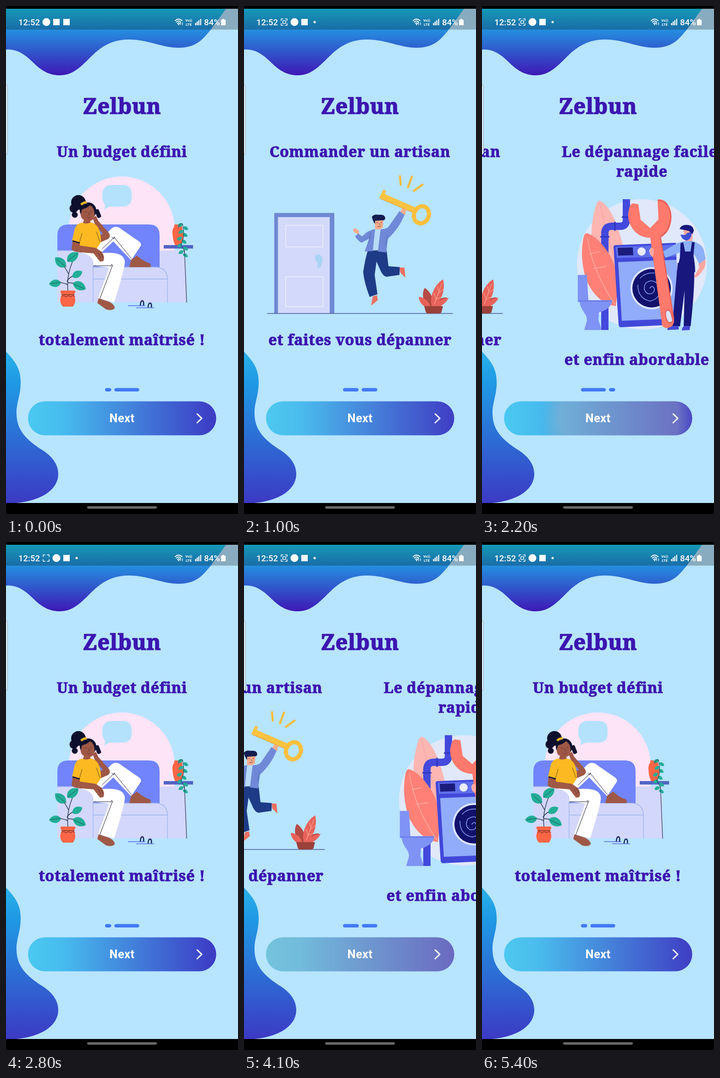
An HTML page that plays this animation: 506 px wide and 1107 px high, repeating every 5.6 s.

```html
<!DOCTYPE html>
<html lang="fr">
<head>
<meta charset="utf-8">
<title>Onboarding</title>
<style>
  html, body { margin: 0; width: 100%; height: 100%; overflow: hidden; background: #000; }
  svg { display: block; width: 506px; height: 1107px; }
  .serif { font: 700 32.4px "Noto Serif", serif; letter-spacing: .7px; fill: #3c16b0; stroke: #3c16b0; stroke-width: 1.1; text-anchor: middle; }
  .title { font-size: 46.6px; stroke-width: 1.6; }
  .bar { font: 500 18.5px Roboto, sans-serif; fill: #fff; }
  .tiny { font: 700 8px Roboto, sans-serif; fill: #fff; text-anchor: middle; }
  .next { font: 700 25.5px Roboto, sans-serif; letter-spacing: .4px; fill: #fff; text-anchor: middle; }
  .line { fill: none; stroke-linecap: round; stroke-linejoin: round; }
  .flat { stroke-linecap: butt; }
</style>
</head>
<body>
<svg viewBox="0 0 506 1107">
  <defs>
    <linearGradient id="wave" gradientUnits="userSpaceOnUse" x1="0" y1="6" x2="0" y2="151">
      <stop offset="0" stop-color="#1bccf4"/><stop offset=".31" stop-color="#2490df"/><stop offset="1" stop-color="#3e18b6"/>
    </linearGradient>
    <linearGradient id="blob" gradientUnits="userSpaceOnUse" x1="0" y1="753" x2="0" y2="1083">
      <stop offset="0" stop-color="#2bb0ea"/><stop offset=".2" stop-color="#1f9ae4"/><stop offset="1" stop-color="#3c3ac4"/>
    </linearGradient>
    <linearGradient id="pill">
      <stop offset="0" stop-color="#4ac9f1"/><stop offset=".18" stop-color="#47bcee"/><stop offset="1" stop-color="#3c3ac4"/>
    </linearGradient>
    <radialGradient id="soft">
      <stop offset=".75" stop-color="#bababa"/><stop offset="1" stop-color="#bababa" stop-opacity="0"/>
    </radialGradient>
    <clipPath id="pillClip"><rect x="48" y="861.500" width="410.500" height="74" rx="37"/></clipPath>
    <path id="leaf" d="M0 0C5-13 22-14 31 0C22 11 8 12 0 0Z"/>
  </defs>

  <rect y="6" width="506" height="1077" fill="#b7e4ff"/>
  <path fill="url(#wave)" d="M0 95C20 93 38 102 58 122C78 142 95 151 117 151C148 151 165 130 188 108C212 84 238 73 268 73C310 73 340 91 376 91C415 91 430 72 447 51L480 6H0Z"/>
  <path fill="url(#blob)" d="M0 753C20 775 32 790 32 820C32 850 22 865 23 890C24 925 45 945 75 965C100 980 114 998 114 1020C114 1052 80 1078 22 1083H0Z"/>
  <text class="serif title" x="253" y="235">Zelbun</text>

  <g id="pages">
    <!-- budget -->
    <g>
      <text class="serif" x="253" y="329">Un budget défini</text>
      <text class="serif" x="253" y="739">totalement maîtrisé !</text>
      <path fill="#fde4f6" d="M137 487A115.500 115.500 0 0 1 368 487V533H137Z"/>
      <path fill="#b4e1fb" d="M230 390H254Q274 390 274 409V418Q274 437 252 437H229Q221 438 213 444Q218 436 214 430Q210 424 210 412Q210 391 230 390Z"/>
      <path fill="#7284fb" d="M112 569V500Q112 476 136 476H312Q335 476 335 500V569Z"/>
      <path fill="#d3d7fb" d="M112 533H168Q190 534 190 558V569H335V533H392L395 646H112Z"/>
      <path class="line" stroke="#9db4ee" stroke-width="1.300" d="M112 533H168Q190 534 190 558V646M190 569H328Q352 571 352 596V646M190 595H352"/>
      <path class="line" stroke="#28345e" stroke-width="1.200" d="M389 528L394 646"/>
      <path fill="#fc6545" d="M367 476H384V483Q388 495 387 504Q385 519 380 522H369Q363 508 363 493Q363 485 367 481Z"/>
      <rect x="344" y="521" width="64" height="7.500" fill="#5265c6"/>
      <g id="vine" fill="#22ae97"></g>
      <path class="line" stroke="#173a4a" d="M376 483Q380 472 385 475Q392 505 381 520Q390 532 390 545"/>

      <g fill="#0d0f2c">
        <circle cx="158" cy="428" r="16"/><circle cx="148" cy="441" r="9.500"/><circle cx="150" cy="455" r="6.500"/>
        <ellipse cx="179" cy="446" rx="18" ry="18"/>
      </g>
      <path class="line flat" stroke="#fdb92b" stroke-width="5" d="M164 433Q168 428 176 428"/>
      <path fill="#9f5846" d="M166 443Q178 440 183 434Q194 440 193 455Q192 467 184 468L185 476H167L170 466Q162 462 163 452Z"/>
      <path class="line" stroke="#552b2b" d="M172 449h4M184 448h4M180 450l2 6M177 461q4 2 7-1"/>
      <rect x="196" y="443" width="9" height="19" rx="3" fill="#11122f" transform="rotate(-22 200 452)"/>
      <path fill="#fff" d="M186 527L228 487Q236 478 247 483L290 513Q297 518 293 524L273 554L234 513L200 545Z"/>
      <path fill="#9f5846" d="M273 553L286 544Q298 556 314 561Q319 569 311 569H269Z"/>
      <path class="line" stroke="#15152f" d="M210 529L236 504L274 551M231 504l4 3 2-4"/>
      <path fill="#9f5846" d="M189 462L196 457L201 468L224 494Q230 503 222 508L206 515L202 499L212 497L195 478Z"/>
      <path fill="#fff" d="M157 535Q200 538 215 538Q262 535 259 562Q255 585 236 646L201 636L225 570L190 566V558Q189 542 157 535Z"/>
      <path class="line" stroke="#15152f" d="M191 566H232L205 637M229 563l4 2"/>
      <path fill="#9f5846" d="M202 637L226 645Q238 652 237 659Q230 665 218 661L199 647Z"/>
      <path fill="#fdb921" d="M166 472Q154 474 150 485L144 512L160 517L157 535Q175 540 193 536L207 515Q208 494 200 481Q193 472 184 472Q175 476 166 472Z"/>
      <path class="line" stroke="#6b4a15" d="M166 495L160 516M197 492Q202 505 205 514"/>
      <path fill="#9f5846" d="M145 513L143 530Q148 537 168 537L191 539L201 552L205 557L212 556Q217 548 209 536L196 527L161 522V517Z"/>
      <path class="line" stroke="#15152f" stroke-width="2.500" d="M146 512l14 4"/>
      <path class="line" stroke="#5b332c" d="M201 538l6 11M206 536l5 11"/>

      <path class="line" stroke="#20304a" stroke-width="1.400" d="M135 620Q131 580 153 541M136 583Q128 566 114 555M133 600Q140 588 160 582M134 607Q120 600 98 605M135 603Q150 602 169 615"/>
      <g fill="#22ae97">
        <use href="#leaf" transform="translate(134 557) rotate(-39)"/>
        <use href="#leaf" transform="translate(131 568) rotate(-140)"/>
        <use href="#leaf" transform="translate(145 591) rotate(-30) scale(.8)"/>
        <use href="#leaf" transform="translate(120 602) rotate(172) scale(.85)"/>
        <use href="#leaf" transform="translate(146 604) rotate(25)"/>
      </g>
      <path class="line" stroke="#20495a" stroke-width=".9" d="M134 556L155 540M131 569L111 552M120 602L98 605M146 605L170 616"/>
      <path fill="#fc6545" d="M121 620H149Q152 620 151 624L148 629Q155 643 146 655H124Q114 643 122 629L119 624Q118 620 121 620Z"/>
      <path class="line" stroke="#80372f" stroke-width="1.300" d="M121 629H149M121 633l5-2 5 3 5-3 5 3 5-3 4 2"/>
      <path class="line" stroke="#6d84ea" stroke-width="2" d="M267 653H303M285 657.500H322"/>
      <path class="line" stroke="#1c2461" stroke-width="2.500" d="M293 652Q294 640 299 643Q301 647 300 652M310 656Q311 645 316 648Q318 651 317 656"/>
    </g>

    <!-- craftsman -->
    <g transform="translate(506)">
      <text class="serif" x="253" y="329">Commander un artisan</text>
      <text class="serif" x="253" y="739">et faites vous dépanner</text>
      <rect x="66" y="451" width="131" height="219" fill="#7089d2"/>
      <rect x="74" y="460" width="113" height="210" fill="#d2d9fb"/>
      <path class="line" stroke="#f1f0fb" stroke-width="1.500" d="M91 478H172V525H91ZM91 590H172V655H91Z"/>
      <path fill="#a8d3f5" d="M155 547Q157 541 165 542Q172 546 171 555Q169 560 168 566Q166 572 161 571Q159 565 161 559Q155 557 155 547Z"/>
      <path class="line" stroke="#4c5a96" stroke-width="1.500" d="M51 670H455"/>
      <g transform="translate(168)">
        <path class="line flat" stroke="#fbbd3a" stroke-width="4.500" d="M172 369L174 391M199 370L189 397M223 388L201 404"/>
        <path fill="#d99a28" d="M129 420L201 451L204 445L132 414Z"/>
        <path fill="#fdc23f" d="M136 400L142 403L139 410L206 439L201 450L127 418Z"/>
        <ellipse class="line" cx="219" cy="455" rx="16" ry="19" stroke="#fdbf3c" stroke-width="9" transform="rotate(22 219 455)"/>
        <path fill="#f6ad8d" d="M172 452L177 441L186 444L183 456ZM84 499L72 493Q67 486 75 484L82 489ZM117 465H136L135 482Q128 488 126 486V490H118Z"/>
        <path fill="#141d51" d="M111 459Q116 453 125 455Q139 453 140 462Q140 468 133 467L118 468L118 475Q112 468 111 459Z"/>
        <path class="line" stroke="#6a2c35" d="M121 472h3M130 472h3M123 480q5 3 8-1M127 474l1 3"/>
        <path fill="#1d3b86" d="M102 533L143 532L147 567L172 569L171 586L143 590Q136 589 131 579L121 557L117 586L123 628L106 634Q94 602 92 580Q96 552 102 533Z"/>
        <path fill="#ea7160" d="M113 633L122 630L124 641L109 653ZM171 570H182L184 592L173 581Z"/>
        <path fill="#b7dcfa" d="M115 487L130 486L126 532H113Z"/>
        <path fill="#7089d7" d="M118 486L113 534L95 535L105 507L88 516Q79 510 74 502L81 496L90 502Q101 489 118 486ZM130 486Q143 487 148 480L171 447L182 455Q170 485 146 507L142 537L124 535Z"/>
        <path class="line" stroke="#4b64b3" d="M108 494L104 515M145 500L141 520"/>
        <g fill="#b64b45">
          <use href="#leaf" transform="translate(240 657) rotate(-108) scale(1.45 1)"/>
          <use href="#leaf" transform="translate(246 657) rotate(-38) scale(1.15 .7)"/>
        </g>
        <g fill="#e8635a">
          <use href="#leaf" transform="translate(244 657) rotate(-70) scale(2.100 1.150)"/>
          <use href="#leaf" transform="translate(238 657) rotate(-137) scale(1.100 .7)"/>
          <use href="#leaf" transform="translate(246 658) rotate(-34) scale(1.250 .6)"/>
        </g>
        <path class="line" stroke="#fbb7a4" d="M247 650L263 606M251 638L246 626M254 628L268 616M257 622L254 611M250 640L262 634"/>
        <path fill="#9a4139" d="M225 654H266L263 666Q262 670 257 670H234Q229 670 228 665Z"/>
      </g>
    </g>

    <!-- repair -->
    <g transform="translate(1012)">
      <text class="serif" x="253" y="329">Le dépannage facile,</text>
      <text class="serif" x="253" y="372">rapide</text>
      <text class="serif" x="253" y="782">et enfin abordable !</text>
      <g transform="translate(-113)">
        <circle cx="366" cy="563" r="142" fill="#e0e8f9"/>
        <path fill="#fdb6b2" d="M274 424Q292 432 308 470Q326 515 330 560L318 620L270 570Q245 510 264 440Q267 426 274 424Z"/>
        <path class="line" stroke="#f79a98" d="M274 432Q288 490 314 580"/>
        <path class="line flat" stroke="#4349dc" stroke-width="16" d="M332 421V466Q332 480 318 480H300Q285 480 285 496V706"/>
        <path class="line flat" stroke="#3036bd" stroke-width="3" d="M322 460H342M307 470V490M275 503H295"/>
        <path fill="#ff8076" d="M246 495Q270 502 296 543Q312 570 313 615L309 654Q267 648 244 596Q230 548 238 507Q240 495 246 495Z"/>
        <path class="line" stroke="#fbb0a8" stroke-width="1.500" d="M247 505Q258 578 307 650M252 540L274 535M260 572L288 568"/>
        <path fill="#7f93f5" d="M226 586H246L249 641H301Q300 660 272 668L271 684L278 706H240L246 685Q246 675 239 667Q231 655 230 645H226Z"/>
        <path class="line" stroke="#6478e2" stroke-width="2" d="M228 643H299"/>
        <path fill="#4148d9" d="M304 525Q304 521 309 521L440 516L446 694L320 700Q316 700 315 695Z"/>
        <path fill="#5f70ec" d="M309 525L440 520L441 546L311 549Z"/>
        <path fill="#91acfa" d="M314 558L441 553L445 681L322 686Z"/>
        <path fill="#1b1b7d" d="M313 527L346 526L347 543L314 544Z"/>
        <circle cx="365" cy="535" r="9" fill="#e8ecfd"/><circle cx="389" cy="534" r="7" fill="#e8ecfd"/>
        <circle cx="387" cy="615" r="46" fill="#dce5ff"/><circle cx="387" cy="615" r="42" fill="#12126c"/>
        <path class="line" stroke="#8ca2f5" stroke-width="1.500" d="M383 615Q389 607 393 616Q393 629 379 627Q366 619 374 604Q390 592 403 609Q410 637 384 643Q357 638 357 608M362 593Q374 580 393 582"/>

        <path fill="#17177d" d="M444 560L479 556Q483 600 472 698H457L459 620L449 698H432Z"/>
        <path fill="#4549d5" d="M421 706Q421 698 433 697H446V705ZM453 707Q453 699 460 697H471L470 706Z"/>
        <path fill="#fba6a0" d="M383 541Q383 528 390 530L412 537L414 548L392 550ZM481 587L491 570L489 561L503 549Q508 566 497 578Q488 592 480 592ZM456 487L477 490L475 516H461Z"/>
        <path fill="#8cb0fb" d="M412 535L437 520Q452 511 474 512Q496 517 501 532L505 551L491 562L480 541V567H448V537L417 549Z"/>
        <path fill="#17177d" d="M450 517L456 515L460 535H472L475 514L481 515L478 545Q482 560 482 580L442 582Q445 562 449 548Z"/>
        <path fill="#3d50d6" d="M450 498L460 499L466 494L474 493Q475 507 464 511Q453 510 450 498Z"/>
        <path fill="#17177d" d="M448 486Q451 477 463 477Q478 477 479 490L476 497L468 490Z"/>
        <path fill="#ff796c" d="M346 430L358 432L363 466L384 484L402 465L400 422Q416 419 425 437Q434 456 428 477Q422 497 407 504L436 684Q436 700 420 702Q408 701 409 687L384 505Q360 505 346 486Q331 465 338 441Q340 432 346 430Z"/>
        <path class="line" stroke="#e95d58" stroke-width="2.500" d="M402 423Q426 426 429 457Q427 491 406 503L435 681"/>
        <path fill="#dce4fb" stroke="#d95254" stroke-width="1.500" d="M418 666Q424 659 429 669L433 686Q428 693 422 687Q416 676 418 666Z"/>
        <path fill="#fba6a0" d="M383 530q5-7 9 0l-1 15q-8-3-8-15Z"/>
      </g>
    </g>
  </g>

  <g fill="#4279f4">
    <rect id="dotA" x="216" y="832.500" height="7.500" rx="3.750"/>
    <rect id="dotB" y="832.500" height="7.500" rx="3.750"/>
  </g>
  <g clip-path="url(#pillClip)">
    <rect x="48" y="861" width="411" height="75" fill="url(#pill)"/>
    <circle id="ripple" cx="300" cy="898" r="0" fill="url(#soft)"/>
  </g>
  <text class="next" x="253" y="907">Next</text>
  <path class="line" stroke="#fff" stroke-width="3" d="M417 889L427 898.500L417 908"/>

  <rect x="-8" y="171.500" width="11.500" height="152" rx="4" fill="#cfeafa" stroke="#a5a9ad"/>
  <rect y="6" width="506" height="45.500" opacity=".25"/>
  <rect width="506" height="6"/>
  <rect y="1083" width="506" height="24"/>
  <rect x="177" y="1090" width="152" height="5.500" rx="2.750" fill="#686868"/>

  <text class="bar" x="27" y="41.500">12:52</text>
  <g id="early" fill="#fff">
    <circle cx="88" cy="35" r="8.500"/><rect x="103" y="28" width="14" height="14"/><rect x="125" y="28" width="14" height="14"/>
  </g>
  <g id="late" fill="#fff">
    <path class="line" stroke="#fff" stroke-width="1.500" d="M81 32V28H85M90 28H94V32M94 38V42H90M85 42H81V38"/>
    <rect id="rec" class="line" x="84.500" y="32" width="6.500" height="6" rx="1" stroke="#fff" stroke-width="1.500"/>
    <circle cx="110" cy="35" r="8.500"/><rect x="125" y="28" width="14" height="14"/><circle cx="154" cy="35" r="2.500"/>
  </g>
  <path class="line" stroke="#fff" stroke-width="1.800" d="M369 32Q376 25 384 32M371.500 35Q376 30 381 35M374 38Q376 35 379 38"/>
  <path class="line" stroke="#fff" stroke-width="1.200" d="M381 41V36M385 36V41"/>
  <circle cx="376.500" cy="40" r="1.600" fill="#fff"/>
  <text class="tiny" x="398.500" y="34">Vo))</text><text class="tiny" x="398.500" y="42.500">LTE</text>
  <path class="line flat" stroke="#fff" stroke-width="2.300" d="M413.500 42V37M417 42V34M420.500 42V31M424.500 42V28"/>
  <text class="bar" x="432" y="41.500">84%</text>
  <path fill="#fff" d="M472 28H476V30H479V42H469V30H472Z"/>
</svg>
<script>
const $ = id => document.getElementById(id);
const LOOP = 5600, STEP = 100, WIDTH = 506, SCROLL = 500, DOT = 300;

// tap time, scroll start, from page, to page
const moves = [
  [400, 422, 0, 1], [1400, 1492, 1, 2], [2100, 2150, 2, 0],
  [3100, 3150, 0, 1], [3900, 3940, 1, 2], [4800, 4846, 2, 0]
];
// moments when the nearest page changes
const turns = moves.flatMap(([, start, from, to]) =>
  to > from ? [[start + 147, to]] : [[start + 90, 1], [start + 227, 0]]);

const clamp = x => Math.min(1, Math.max(0, x));

// cubic-bezier(.25, .1, .25, 1)
function ease(x) {
  if (x <= 0) return 0;
  if (x >= 1) return 1;
  const curve = (a, b, s) => 3 * a * s * (1 - s) ** 2 + 3 * b * s * s * (1 - s) + s ** 3;
  let lo = 0, hi = 1;
  for (let i = 0; i < 20; i++) {
    const mid = (lo + hi) / 2;
    if (curve(.25, .25, mid) < x) lo = mid; else hi = mid;
  }
  return curve(.1, 1, lo);
}

function draw(t) {
  let page = 0, dot = 0, age = 0;
  for (const [tap, start, from, to] of moves) {
    if (t >= start) page = from + (to - from) * ease((t - start) / SCROLL);
    if (t >= tap) age = t - tap;
  }
  for (const [at, target] of turns) dot += (target - dot) * ease((t - at) / DOT);
  const fade = 1 - clamp((age - 350) / 270);

  $('pages').setAttribute('transform', `translate(${-WIDTH * page})`);
  const left = 13.5 + 20.25 * dot;
  $('dotA').setAttribute('width', left);
  $('dotB').setAttribute('x', 223 + left);
  $('dotB').setAttribute('width', 67.5 - left);
  $('ripple').setAttribute('r', age ? 20 + age * 1.5 + Math.max(0, age - 100) * 2.5 : 0);
  $('ripple').setAttribute('opacity', .37 * fade);
  $('early').style.display = t < 100 ? '' : 'none';
  $('late').style.display = t < 100 ? 'none' : '';
  $('rec').style.display = t % 1000 < 500 ? '' : 'none';
}

$('vine').innerHTML = Array.from({ length: 10 }, (_, i) =>
  `<use href="#leaf" transform="translate(${385 + Math.sin(i) * 2} ${474 + i * 7.4}) rotate(${i % 2 ? 30 : 150}) scale(.4)"/>`).join('');

const began = performance.now();
function tick() {
  const t = (performance.now() - began) % LOOP;
  draw(Math.floor(t / STEP) * STEP);
  requestAnimationFrame(tick);
}
draw(0);
requestAnimationFrame(tick);
</script>
</body>
</html>
```
